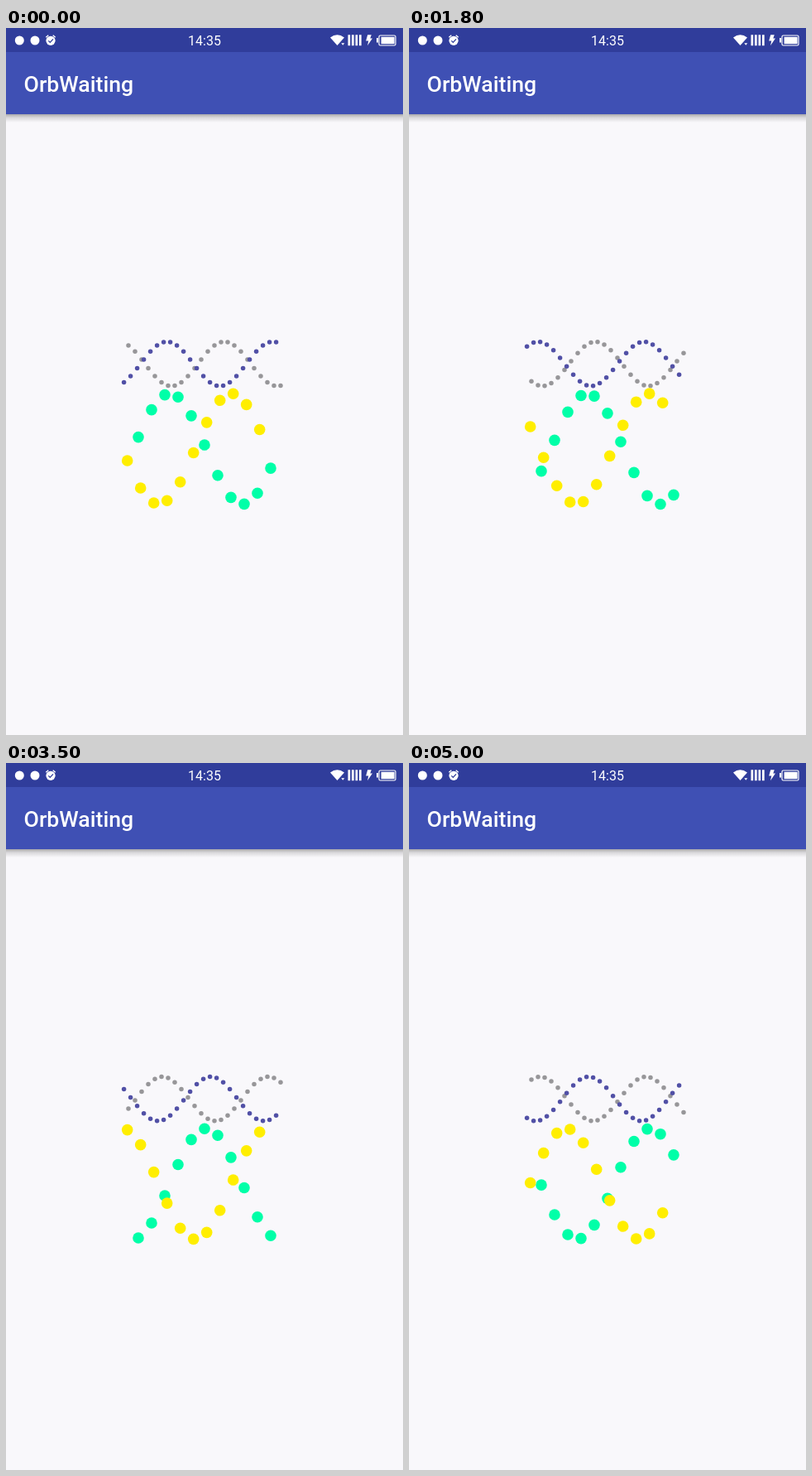
These frames come from a looping animation (480 by 853 pixels, 5.1 s). An HTML page:

```html
<!DOCTYPE html>
<html lang="en">
<head>
<meta charset="utf-8">
<title>OrbWaiting</title>
<style>
  html, body { margin: 0; width: 100%; height: 100%; overflow: hidden; background: #f9f8fb; }
  svg { display: block; width: 100%; height: 100%; }
  text { font-family: Roboto, sans-serif; fill: #fff; }
</style>
</head>
<body>
<svg id="stage" viewBox="0 0 480 853">
  <defs>
    <linearGradient id="shade" x1="0" y1="0" x2="0" y2="1">
      <stop offset="0" stop-color="#000" stop-opacity=".32"/>
      <stop offset=".4" stop-color="#000" stop-opacity=".13"/>
      <stop offset="1" stop-color="#000" stop-opacity="0"/>
    </linearGradient>
  </defs>
  <rect width="480" height="853" fill="#f9f8fb"/>
  <rect y="104" width="480" height="10" fill="url(#shade)"/>
  <rect y="29" width="480" height="75" fill="#3f50b4"/>
  <rect width="480" height="29" fill="#303d9b"/>

  <text x="240" y="21" font-size="16" text-anchor="middle">14:35</text>
  <text x="21.5" y="77" font-size="26.67" font-weight="500">OrbWaiting</text>

  <g fill="#fff">
    <circle cx="16.3" cy="15" r="5.5"/>
    <circle cx="35" cy="15" r="5.5"/>
    <circle cx="54" cy="15.3" r="5.6"/>
    <path d="M48.3 11.2 51.3 8.7M59.7 11.2 56.7 8.7" stroke="#fff" stroke-width="1.4"/>
    <path d="M51.3 15.4 53.3 17.4 57 13.4" fill="none" stroke="#303d9b" stroke-width="1.3"/>

    <path d="M392 11.5Q400.5 5 409 11.5L400.5 21Z"/>
    <path d="M405.3 18.2H409.3L407.3 20.8Z"/>
    <path id="uplink" d="M405.3 17.2H409.3L407.3 14.6Z"/>
    <path d="M413.5 8.3h2.7v13h-2.7zM418 8.3h2.7v13H418zM422.5 8.3h2.7v13h-2.7zM427 8.3h2.7v13H427z"/>
    <path d="M437.2 8.3H441.8L440.3 12.6H443L437 21.2 438.3 15.4H435.2Z"/>
    <rect x="448" y="12" width="2" height="5.5"/>
    <rect x="451" y="9" width="20" height="12" rx="1.5" fill="none" stroke="#fff" stroke-width="1.2"/>
    <rect x="453.6" y="10.8" width="16" height="8.4"/>
  </g>
</svg>
<script>
  const LOOP = 5100, STEP = 100, LAST = 4938, TAU = Math.PI * 2;
  const stage = document.getElementById('stage');
  const uplink = document.getElementById('uplink');

  // A strand is a row of dots on a travelling cosine; crest and wave are in px.
  const small = { count: 24, gap: 8, r: 2.75, mid: 405.2, amp: 26.7, crest: 52, wave: 128, period: 6000 };
  const large = { count: 11, gap: 16, r: 6.8, mid: 507.8, amp: 66.7, crest: 38, wave: 176, period: 2000 };
  const strands = [
    { ...small, x: 148, sign: -1, color: '#979699' },
    { ...small, x: 142.6, sign: 1, color: '#5150a6' },
    { ...large, x: 160, sign: 1, color: '#00ffa8' },
    { ...large, x: 146.7, sign: -1, color: '#ffee00' }
  ];

  function addDot(s, i) {
    const dot = document.createElementNS('http://www.w3.org/2000/svg', 'circle');
    dot.setAttribute('cx', s.x + i * s.gap);
    dot.setAttribute('r', s.r);
    dot.setAttribute('fill', s.color);
    return stage.appendChild(dot);
  }

  for (const s of strands) {
    s.dots = Array.from({ length: s.count }, (_, i) => addDot(s, i));
  }

  function draw(now) {
    const tick = Math.floor((now % LOOP) / STEP) * STEP;
    const t = Math.min(tick, LAST);
    for (const s of strands) {
      s.dots.forEach((dot, i) => {
        const angle = TAU * ((i * s.gap - s.crest) / s.wave + t / s.period);
        dot.setAttribute('cy', (s.mid - s.sign * s.amp * Math.cos(angle)).toFixed(2));
      });
    }
    uplink.setAttribute('visibility', tick >= 4400 && tick < 4900 ? 'visible' : 'hidden');
  }

  const start = performance.now();
  function frame() {
    draw(performance.now() - start);
    requestAnimationFrame(frame);
  }
  frame();
</script>
</body>
</html>
```
